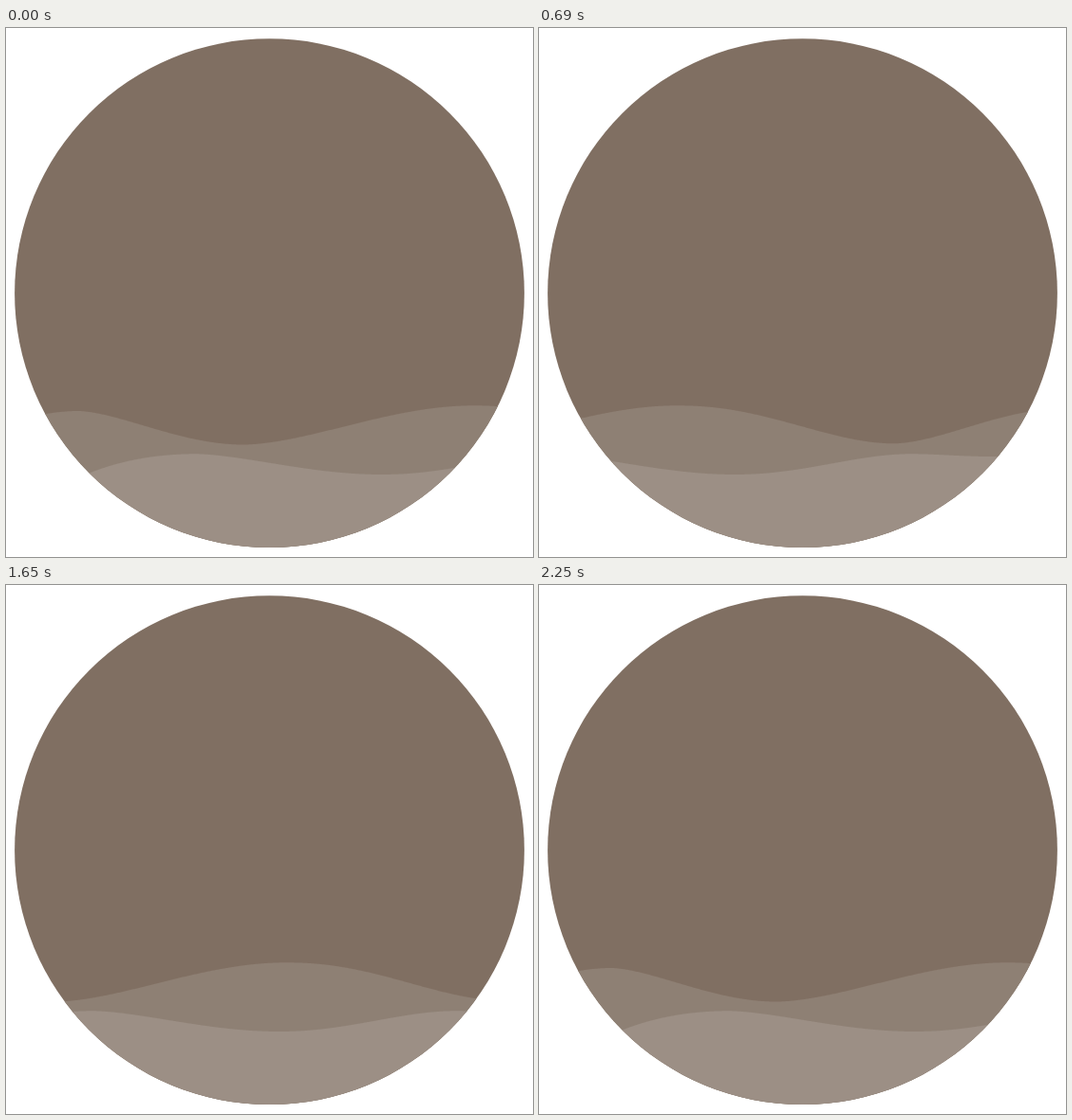
Write an HTML page with a canvas that moves like this. It is 555 px wide and 558 px high and loops after 2280 ms.

```html
<!DOCTYPE html>
<html lang="en">
<head>
<meta charset="utf-8">
<title>Waves</title>
<style>
  html, body { margin: 0; width: 100%; height: 100%; overflow: hidden; background: #fff; }
  canvas { display: block; }
</style>
</head>
<body>
<canvas id="stage" width="555" height="558"></canvas>
<script>
const ctx = document.getElementById('stage').getContext('2d');
const WIDTH = 555, HEIGHT = 558;
const LOOP = 2280, STEP = 30;
const LEAVE = 10, TURN = 980, RETURN = 2265;

// Crests and troughs; skew leans the slope that leads up to each one.
const backWave = {
  color: '#8e8074', travel: 427,
  turns: [
    { x: -110, y: 439 },
    { x: 76, y: 404, skew: 1 },
    { x: 250, y: 439.5, skew: 0.85 },
    { x: 492, y: 398.3, skew: 0.9 },
    { x: 721, y: 438.3, skew: 1.15 },
    { x: 897, y: 401.8, skew: 0.9 },
    { x: 1070, y: 439, skew: 0.9 }
  ]
};
const frontWave = {
  color: '#9c8f85', travel: 233,
  turns: [
    { x: 50, y: 490 },
    { x: 200, y: 449.3, skew: 0.5 },
    { x: 395, y: 471, skew: 0.85 },
    { x: 581, y: 449.3, skew: 1.1 },
    { x: 663, y: 452, skew: 1 },
    { x: 800, y: 444, skew: 1 }
  ]
};

const smooth = u => u * u * (3 - 2 * u);

// Cubic bezier easing (.42, 0, .58, 1), solved by bisection.
function easeInOut(x) {
  if (x <= 0) return 0;
  if (x >= 1) return 1;
  let low = 0, high = 1;
  for (let i = 0; i < 30; i++) {
    const u = (low + high) / 2, v = 1 - u;
    if (1.26 * u * v * v + 1.74 * u * u * v + u * u * u < x) low = u;
    else high = u;
  }
  return smooth(low);
}

function surface(turns, x) {
  if (x <= turns[0].x) return turns[0].y;
  const next = turns.findIndex(turn => turn.x > x);
  if (next < 0) return turns[turns.length - 1].y;
  const a = turns[next - 1], b = turns[next];
  const u = (x - a.x) / (b.x - a.x);
  return a.y + (b.y - a.y) * smooth(Math.pow(u, b.skew));
}

function drawWave({ color, turns, travel }, progress) {
  ctx.fillStyle = color;
  ctx.beginPath();
  ctx.moveTo(0, HEIGHT);
  for (let x = 0; x <= WIDTH; x++) {
    ctx.lineTo(x, surface(turns, x + travel * progress));
  }
  ctx.lineTo(WIDTH, HEIGHT);
  ctx.fill();
}

function render(now) {
  const t = Math.floor((now % LOOP) / STEP) * STEP;
  const progress = t < TURN
    ? easeInOut((t - LEAVE) / (TURN - LEAVE))
    : 1 - easeInOut((t - TURN) / (RETURN - TURN));

  ctx.fillStyle = '#fff';
  ctx.fillRect(0, 0, WIDTH, HEIGHT);
  ctx.save();
  ctx.beginPath();
  ctx.arc(277.5, 279.7, 268.4, 0, Math.PI * 2);
  ctx.fillStyle = '#806f62';
  ctx.fill();
  ctx.clip();
  drawWave(backWave, progress);
  drawWave(frontWave, progress);
  ctx.restore();
}

let start = null;
function tick(now) {
  if (start === null) start = now;
  render(now - start);
  requestAnimationFrame(tick);
}
render(0);
requestAnimationFrame(tick);
</script>
</body>
</html>
```
